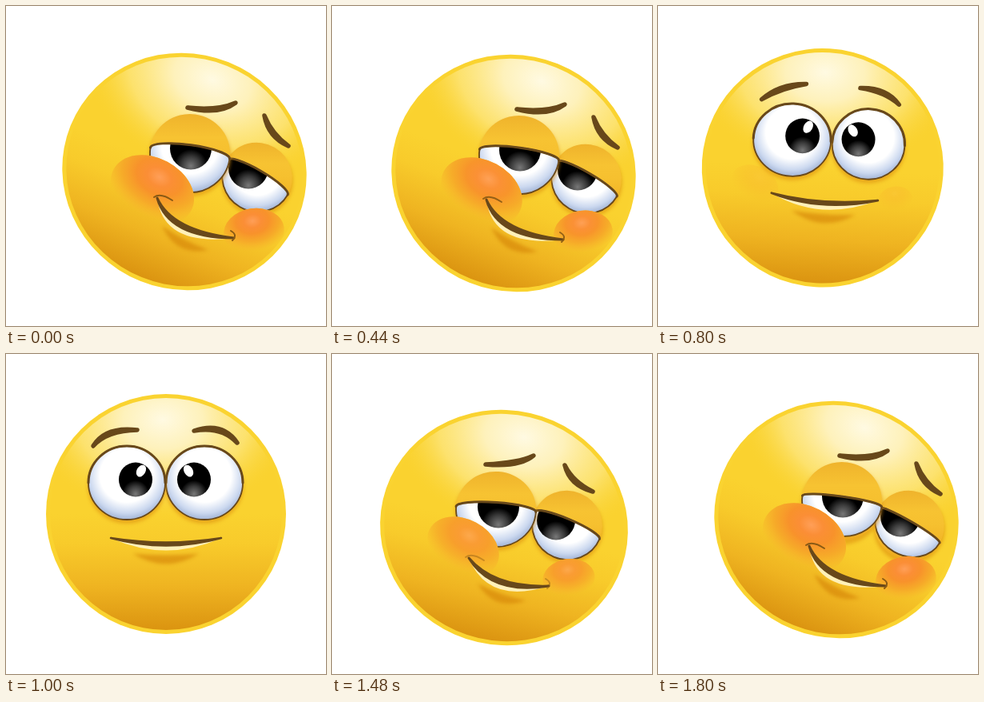
Write an HTML page with a canvas that moves like this. It is 400x400 px and loops after 1840 ms.

```html
<!DOCTYPE html>
<html>
<head>
<meta charset="utf-8">
<title>Smirking face</title>
<style>
html, body { margin: 0; width: 100%; height: 100%; overflow: hidden; background: #fff; }
canvas { display: block; }
</style>
</head>
<body>
<canvas id="stage" width="400" height="400"></canvas>
<script>
const ctx = document.getElementById('stage').getContext('2d');
const LOOP = 1840, STEP = 40, BROWN = '#68481a';

// head/eyes: x, y, rx, ry, tilt. Brows and mouth: start, control, end.
// lids: upper and lower opening. lip: brown bow, cream bow, line width.
const smirk = {
  at: [0, 0], head: [223, 207, 153.5, 147.5, 22], shine: [258, 92],
  eyeL: [230, 184, 50, 49, 8], eyeR: [314, 214, 44, 43, 30], lids: [.18, 1],
  pupilL: [231, 178, 26], pupilR: [303, 203, 25],
  browL: [227, 127, 265, 134, 287, 121], browR: [323, 137, 330, 162, 353, 175],
  mouth: [189, 240, 205, 285, 285, 290], lip: [5, 18, 3],
  blush: [.95, 183, 230, 310, 282]
};
const waking = {
  at: [0, 0], head: [212, 204.5, 152, 148.5, 8], shine: [224, 84],
  eyeL: [187, 174, 49, 45, 5], eyeR: [280, 186, 44, 43, 6], lids: [1, 1],
  pupilL: [200, 168, 22], pupilR: [268, 178, 21],
  browL: [155, 119, 186, 108, 212, 101], browR: [274, 111, 301, 124, 316, 138],
  mouth: [155, 237, 206, 264, 280, 258], lip: [4, 17, 3],
  blush: [.3, 130, 222, 303, 245]
};
const calm = {
  at: [0, 0], head: [200, 200, 150, 150, 0], shine: [196, 82],
  eyeL: [151, 161, 48, 46, 0], eyeR: [248, 161, 48, 46, 0], lids: [1, 1],
  pupilL: [162, 157, 21], pupilR: [235, 157, 21],
  browL: [109, 115, 125, 93, 164, 95], browR: [235, 96, 270, 87, 289, 111],
  mouth: [131, 230, 200, 245, 269, 230], lip: [4, 16, 2.5],
  blush: [0, 115, 225, 290, 240]
};
const squash = {
  at: [0, 0], head: [200, 231.5, 155, 146.5, 0], shine: [197, 116],
  eyeL: [149, 219, 51, 43, 0], eyeR: [249, 219, 50, 43, 0], lids: [.62, .6],
  pupilL: [162, 214, 22], pupilR: [235, 214, 22],
  browL: [114, 172, 141, 154, 172, 167], browR: [228, 168, 261, 156, 281, 172],
  mouth: [167, 288, 197, 288, 227, 288], lip: [1, 20, 7],
  blush: [0, 130, 240, 280, 260]
};
const rising = {
  at: [0, 0], head: [215, 217, 155.3, 146.7, 13], shine: [240, 104],
  eyeL: [205, 194, 50, 47, 4], eyeR: [294, 214, 44, 43, 23], lids: [.18, 1],
  pupilL: [208, 191, 26], pupilR: [280, 208, 24],
  browL: [192, 138, 234, 139, 252, 127], browR: [291, 139, 299, 162, 326, 172],
  mouth: [171, 255, 201, 297, 271, 290], lip: [5, 18, 3],
  blush: [.72, 164, 241, 296, 281]
};
const squint = { ...smirk, lids: [.12, .89], blush: [1, 183, 230, 310, 282] };
const widen = { ...squint, lids: [.21, 1] };

const keys = [
  [0, widen], [160, smirk], [400, smirk], [480, { ...smirk, at: [8, 4] }],
  [680, waking], [980, calm], [1160, calm], [1280, squash],
  [1330, { ...squash, at: [0, 5], head: [200, 231.5, 157, 146.5, 0] }],
  [1480, rising], [1720, smirk], [1800, squint], [1840, widen]
];

// Monotone cubic interpolation: holds stay still, extremes never overshoot.
function tween(i, u, value) {
  const span = k => keys[k + 1][0] - keys[k][0];
  const slope = k => (value(k + 1) - value(k)) / span(k);
  const tangent = k => {
    if (k < 1 || k > keys.length - 2) return 0;
    const a = slope(k - 1), b = slope(k);
    return a * b <= 0 ? 0 : 2 * a * b / (a + b);
  };
  const v = 1 - u, h = span(i);
  return value(i) * v * v * (1 + 2 * u) + value(i + 1) * u * u * (3 - 2 * u)
    + h * u * v * (v * tangent(i) - u * tangent(i + 1));
}

function poseAt(t) {
  const i = keys.findIndex((k, n) => t < keys[n + 1][0]);
  const u = (t - keys[i][0]) / (keys[i + 1][0] - keys[i][0]);
  const pose = {};
  for (const name in calm)
    pose[name] = calm[name].map((_, n) => tween(i, u, k => keys[k][1][name][n]));
  return pose;
}

const clamp = x => Math.max(0, Math.min(1, x));
const radians = degrees => degrees * Math.PI / 180;

function scoped(paint) { ctx.save(); paint(); ctx.restore(); }

function fill(style) { ctx.fillStyle = style; ctx.fill(); }

function stroke(style, width) {
  ctx.strokeStyle = style;
  ctx.lineWidth = width;
  ctx.stroke();
}

function oval(x, y, rx, ry, tilt = 0) {
  ctx.beginPath();
  ctx.ellipse(x, y, rx, ry, radians(tilt), 0, 7);
}

function shade(gradient, ...stops) {
  for (const [at, color] of stops) gradient.addColorStop(at, color);
  return gradient;
}
const radial = (x, y, r, ...stops) => shade(ctx.createRadialGradient(x, y, 0, x, y, r), ...stops);
const linear = (x0, y0, x1, y1, ...stops) => shade(ctx.createLinearGradient(x0, y0, x1, y1), ...stops);

function normal([x0, y0, , , x1, y1]) {
  const d = Math.hypot(x1 - x0, y1 - y0);
  return [(y0 - y1) / d, (x1 - x0) / d];
}

// Crescent between two curves that bow by a and b away from the control point.
function ribbon(points, a, b) {
  const [x0, y0, cx, cy, x1, y1] = points, [nx, ny] = normal(points);
  ctx.beginPath();
  ctx.moveTo(x0, y0);
  ctx.quadraticCurveTo(cx + nx * a, cy + ny * a, x1, y1);
  ctx.quadraticCurveTo(cx + nx * b, cy + ny * b, x0, y0);
  ctx.closePath();
}

function drawHead([x, y, rx, ry, tilt], [sx, sy]) {
  const a = radians(tilt), dx = -Math.sin(a) * ry, dy = Math.cos(a) * ry;
  oval(x, y, rx, ry, tilt);
  fill('#fad330');
  oval(x, y, rx - 5, ry - 5, tilt);
  fill(linear(x, y, x + dx, y + dy,
    [0, '#fad22f'], [.25, '#f8cb2b'], [.6, '#efb421'], [1, '#d9910f']));
  scoped(() => {
    ctx.clip();
    ctx.translate(sx, sy);
    ctx.rotate(a);
    ctx.scale(165, 122);
    oval(0, 0, 1, 1);
    fill(radial(0, 0, 1, [0, 'rgba(255,251,232,.97)'], [.3, 'rgba(255,247,212,.85)'],
      [.65, 'rgba(254,236,150,.6)'], [1, 'rgba(250,212,50,0)']));
  });
}

function drawEye([x, y, rx, ry, tilt], [px, py, r], [upper, lower], side) {
  const a = radians(tilt);
  const topEdge = () => ctx.ellipse(x, y, rx, ry * upper, a, Math.PI, 2 * Math.PI);
  const opening = () => {
    ctx.beginPath();
    topEdge();
    ctx.ellipse(x, y, rx, ry * lower, a, 0, Math.PI);
    ctx.closePath();
  };
  scoped(() => {
    ctx.filter = 'blur(2px)';
    oval(x, y + 4, rx + 1, ry + 1, tilt);
    fill('rgba(222,146,16,.6)');
  });
  oval(x, y, rx, ry, tilt);
  fill(linear(x, y - ry, x, y + ry, [0, '#efb32c'], [.3, '#f7c332'], [.5, '#f6c02f'], [1, '#eda91f']));

  scoped(() => {
    opening();
    ctx.clip();
    fill(radial(x, y - ry * .2, ry * 1.25,
      [0, '#fff'], [.58, '#fff'], [.82, '#cbd8ef'], [1, '#97abd0']));
    oval(px, py, r, r * 1.02);
    fill(radial(px, py + r * .85, r, [0, '#777'], [.45, '#3a3a3a'], [.8, '#000']));
    ctx.globalAlpha = clamp(upper * 2 - .4);
    oval(px + side * r * .33, py - r * .52, r * .26, r * .38, side * 30);
    fill('#fff');
  });
  opening();
  stroke(BROWN, 1.8);
  ctx.beginPath();
  topEdge();
  stroke(BROWN, 3);
}

function drawCheek(x, y, rx, ry, tilt, glow) {
  const size = .5 + .5 * glow;
  scoped(() => {
    ctx.translate(x, y);
    ctx.rotate(radians(tilt));
    ctx.scale(rx * size, ry * size);
    oval(0, 0, 1, 1);
    ctx.globalAlpha = clamp(glow * 2.5 - .8);
    fill(radial(0, -.46, 1.3, [0, '#f7c02c'], [.66, '#f7c02c'], [1, 'rgba(247,192,44,0)']));
    ctx.globalAlpha = glow;
    fill(radial(0, -.46, 1.3, [0, '#ff9f58'], [.22, '#fb8e36'], [.42, '#f8922b'],
      [.68, 'rgba(246,166,40,.85)'], [1, 'rgba(246,180,40,0)']));
  });
}

function drawMouth(mouth, [bow, cream, width], corners) {
  const [x0, y0, cx, cy, x1, y1] = mouth, [nx, ny] = normal(mouth);
  const sag = ((cx - (x0 + x1) / 2) * nx + (cy - (y0 + y1) / 2) * ny) / 2;
  const along = (k, off) => [x0 + (x1 - x0) * k + nx * off, y0 + (y1 - y0) * k + ny * off];
  scoped(() => {
    ctx.filter = 'blur(2px)';
    ribbon([...along(.2, sag + 12), ...along(.5, sag + 20), ...along(.8, sag + 12)], -4, 18);
    fill('rgba(214,134,8,.65)');
  });
  ribbon(mouth, 0, cream);
  fill('#fff0b8');
  ribbon(mouth, -bow, bow);
  fill(BROWN);
  stroke(BROWN, width);
  scoped(() => {
    ctx.globalAlpha = corners;
    ctx.beginPath();
    ctx.moveTo(x0 - 4, y0 - 1);
    ctx.quadraticCurveTo(x0 + 4, y0 - 7, x0 + 19, y0 + 3);
    ctx.moveTo(x1 - 4, y1 - 9);
    ctx.quadraticCurveTo(x1 + 5, y1 - 4, x1 - 2, y1 + 3);
    stroke('#8a5a14', 2);
  });
}

function draw(t) {
  const p = poseAt(t), [glow, lx, ly, rx, ry] = p.blush;
  ctx.clearRect(0, 0, 400, 400);
  scoped(() => {
    ctx.translate(...p.at);
    ctx.lineCap = ctx.lineJoin = 'round';
    drawHead(p.head, p.shine);
    drawEye(p.eyeR, p.pupilR, p.lids, -1);
    drawEye(p.eyeL, p.pupilL, p.lids, 1);
    for (const brow of [p.browL, p.browR]) {
      ribbon(brow, -3, 3);
      fill(BROWN);
      stroke(BROWN, 5.5);
    }
    drawCheek(lx, ly, 55, 40, 28, glow);
    drawCheek(rx, ry, 38, 29, -8, glow);
    drawMouth(p.mouth, p.lip, clamp(glow * 2 - 1));
  });
}

function frame() {
  draw(Math.floor(performance.now() % LOOP / STEP) * STEP);
  requestAnimationFrame(frame);
}
frame();
</script>
</body>
</html>
```
